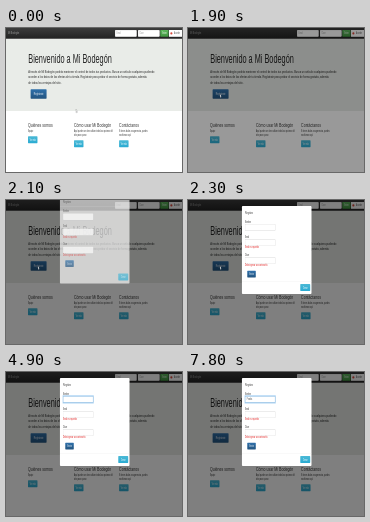
Animation of 176x144 px, one loop 8 s. Source, as an HTML page with a canvas:

```html
<!DOCTYPE html>
<html lang="es">
<head>
<meta charset="utf-8">
<style>
html, body { margin: 0; width: 100%; height: 100%; overflow: hidden; background: #fff; }
canvas { display: block; width: 176px; height: 144px; }
</style>
</head>
<body>
<canvas id="stage" width="176" height="144"></canvas>
<script>
const ctx = document.getElementById('stage').getContext('2d');

// Layout is in page pixels, shrunk onto the stage.
const SX = 0.1183, SY = 0.2, PAGE_W = 176 / SX, PAGE_H = 144 / SY;
const LOOP = 8000, STEP = 100, NAV_H = 54;
const SITE = 'Mi Bodegón';
const INTRO = [
  `A través de ${SITE} podrás mantener el control de todos tus productos. Busca un artículo cualquiera pudiendo`,
  'acceder a los datos de las ofertas de tu tienda. Regístrate para probar el servicio de forma gratuita, además',
  'de todas las ventajas del sitio.'
];
const COLUMNS = [
  { x: 186, title: 'Quiénes somos', lines: ['Equipo'], button: 541 },
  { x: 575, title: `Cómo usar ${SITE}`, lines: ['Aquí puedes ver cómo utilizar todas las opciones del', 'sitio paso a paso'], button: 561 },
  { x: 956, title: 'Contáctanos', lines: ['Si tienes dudas o sugerencias, puedes', 'escribirnos aquí'], button: 561 }
];
const TYPED = 'Prueba', KEYS = [5600, 6100, 6800, 7000, 7300, 7700];

const clamp = v => Math.max(0, Math.min(1, v));
const ease = p => p * p * (3 - 2 * p);
const lerp = (a, b, p) => a + (b - a) * p;

function text(str, x, y, size, color, align = 'left') {
  ctx.font = `${size}px "Liberation Sans", Arial, sans-serif`;
  ctx.textAlign = align;
  ctx.fillStyle = color;
  ctx.fillText(str, x, y);
}

function box(x, y, w, h, fill, r = 4) {
  ctx.fillStyle = fill;
  ctx.beginPath();
  ctx.roundRect(x, y, w, h, r);
  ctx.fill();
}

function shade(y, h, top, bottom) {
  const g = ctx.createLinearGradient(0, y, 0, y + h);
  g.addColorStop(0, top);
  g.addColorStop(1, bottom);
  return g;
}

function button(label, x, y, w, h, top, bottom, size = 14) {
  box(x, y, w, h, shade(y, h, top, bottom));
  text(label, x + w / 2, y + h / 2 + size * 0.36, size, '#fff', 'center');
}

const primary = (label, x, y, w, h, size) => button(label, x, y, w, h, '#2f70aa', '#23547f', size);
const info = (label, x, y, w) => button(label, x, y, w, 35, '#4bb9d6', '#2aabd2');

function field(x, y, w, focused) {
  box(x, y, w, 34, '#ccc');
  box(x + 1, y + 1, w - 2, 32, '#fff');
  if (!focused) return;
  ctx.strokeStyle = 'rgba(102,175,233,.55)';
  ctx.lineWidth = 7;
  ctx.strokeRect(x, y, w, 34);
}

function navbar() {
  box(0, 0, PAGE_W, NAV_H, shade(0, NAV_H, '#3c3c3c', '#222'), 0);
  text(SITE, 16, 32, 18, '#9d9d9d');
  for (const [x, hint] of [[922, 'Email'], [1116, 'Clave']]) {
    field(x, 10, 182);
    text(hint, x + 13, 32, 14, '#999');
  }
  button('Entrar', 1304, 10, 70, 34, '#5cb85c', '#419641');
  box(1378, 10, PAGE_W - 1378, 34, '#fff', 0);
  ctx.fillStyle = '#d9483b';
  ctx.beginPath();
  ctx.ellipse(1398, 27, 9, 9 * SX / SY, 0, 0, Math.PI * 2);
  ctx.fill();
  text('Acceder', 1420, 32, 14, '#555');
}

function page() {
  box(0, 0, PAGE_W, PAGE_H, '#fff', 0);
  box(0, NAV_H, PAGE_W, 415 - NAV_H, '#e9ece8', 0);
  navbar();
  text(`Bienvenido a ${SITE}`, 188, 174, 62, '#222');
  INTRO.forEach((line, i) => text(line, 188, 223 + i * 29.4, 21, '#222'));
  primary('Regístrate', 208, 306, 135, 48, 18);
  for (const c of COLUMNS) {
    text(c.title, c.x, 495, 30, '#333');
    c.lines.forEach((line, i) => text(line, c.x, 521 + i * 20, 14, '#333'));
    info('Ver más', c.x, c.button, 80);
  }
}

function modal(t) {
  const left = 456, width = 588, x = 482;
  box(left, 30, width, 440, '#fff', 6);
  text('Registro', x, 68, 18, '#333');
  box(left, 87, width, 1, '#e5e5e5', 0);
  text('Nombre', x, 114, 14, '#333');
  field(x, 120, 256, t >= 3300);
  text(TYPED.slice(0, KEYS.filter(k => t >= k).length), x + 15, 142, 14, '#444');
  text('Email', x, 190, 14, '#333');
  field(x, 196, 256);
  text('Email es requerido', x, 242, 14, '#e02020');
  text('Clave', x, 280, 14, '#333');
  field(x, 286, 256);
  text('Debe ingresar una contraseña', x, 332, 14, '#e02020');
  primary('Enviar', 501, 354, 72, 34);
  box(left, 405, width, 1, '#e5e5e5', 0);
  info('Cerrar', 949, 420, 84);
}

// Pointer tip in stage pixels.
function pointer(t) {
  if (t >= 3400) return;
  const over = ease(clamp((t - 200) / 700));
  const into = ease(clamp((t - 2500) / 800));
  const x = lerp(lerp(70, 32, over), 72, into);
  const y = lerp(lerp(81, 66, over), 27, into);
  ctx.setTransform(SX, 0, 0, SY, x, y);
  ctx.beginPath();
  ctx.moveTo(0, 0);
  ctx.lineTo(0, 17);
  ctx.lineTo(4, 13);
  ctx.lineTo(7, 20);
  ctx.lineTo(10, 19);
  ctx.lineTo(7, 12);
  ctx.lineTo(12, 12);
  ctx.closePath();
  ctx.fillStyle = '#fff';
  ctx.strokeStyle = '#333';
  ctx.lineWidth = 1;
  ctx.fill();
  ctx.stroke();
}

function draw(t) {
  ctx.setTransform(SX, 0, 0, SY, 0, 0);
  page();
  const dim = 0.5 * clamp((t - 1780) / 150);
  if (t > 1800) box(0, 0, PAGE_W, PAGE_H, `rgba(0,0,0,${dim})`, 0);
  if (t > 2000) {
    const slide = 1 - clamp((t - 2000) / 300);
    ctx.save();
    ctx.globalAlpha = clamp((t - 2000) / 150);
    ctx.translate(0, -110 * Math.pow(slide, 1.8));
    modal(t);
    ctx.restore();
  }
  pointer(t);
}

const start = performance.now();
function tick() {
  const t = (performance.now() - start) % LOOP;
  draw(Math.floor(t / STEP) * STEP);
  requestAnimationFrame(tick);
}
tick();
</script>
</body>
</html>
```
